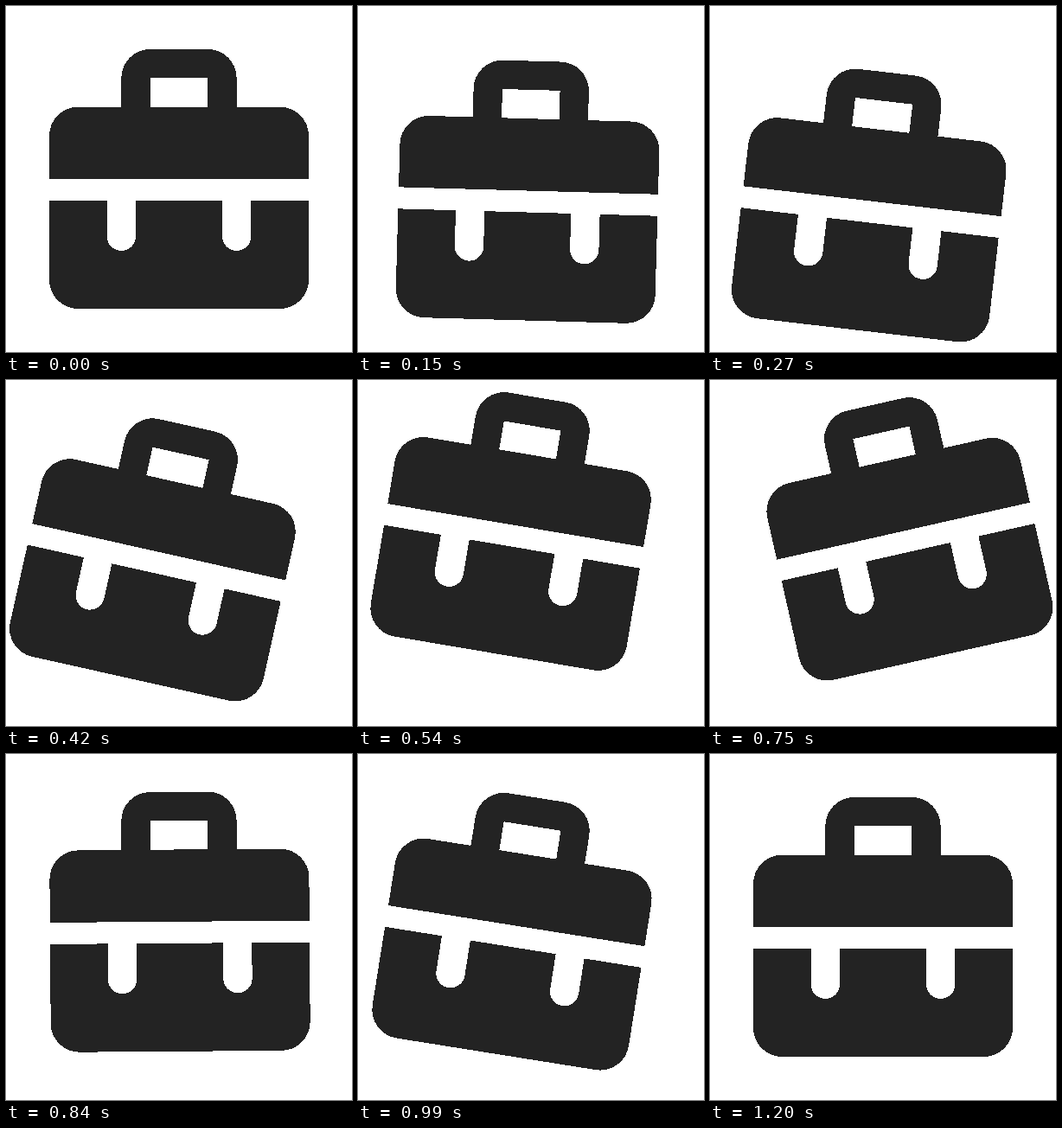
Animation, 400 px wide and 400 px high, one loop 3.23 s. Source, as an HTML page:

```html
<!DOCTYPE html>
<html lang="en">
<head>
<meta charset="utf-8">
<title>Swinging briefcase</title>
<style>
  html, body { margin: 0; width: 100%; height: 100%; overflow: hidden; background: #fff; }
  svg { display: block; width: 100%; height: 100%; }
</style>
</head>
<body>
<svg viewBox="0 0 400 400" shape-rendering="crispEdges">
  <g id="bag" fill="#232323">
    <path d="M50 200V150A33.33 33.33 0 0 1 83.33 116.67H133.33V83.33A33.33 33.33 0 0 1 166.67 50H233.33A33.33 33.33 0 0 1 266.67 83.33V116.67H316.67A33.33 33.33 0 0 1 350 150V200ZM166.67 83.33V116.67H233.33V83.33Z"/>
    <path d="M50 225H116.67V266.67A16.67 16.67 0 0 0 150 266.67V225H250V266.67A16.67 16.67 0 0 0 283.33 266.67V225H350V316.67A33.33 33.33 0 0 1 316.67 350H83.33A33.33 33.33 0 0 1 50 316.67Z"/>
  </g>
</svg>
<script>
  const LOOP = 3230, STEP = 30;
  const PIVOT = '200 93';

  // [time in ms, value, initial pull of the ease towards the next key]
  const angle = [[58, 0], [484, 13.4], [722, -13.8], [940, 10], [1200, 0]];
  const lift = [[0, 0], [300, 27.2, 0.16], [618, -39], [915, 0]];

  const ease = (u, pull = 0) =>
    3 * u * (1 - u) ** 2 * pull + 3 * u * u * (1 - u) + u ** 3;

  function valueAt(keys, t) {
    if (t <= keys[0][0]) return keys[0][1];
    for (let i = 1; i < keys.length; i++) {
      const [t0, a, pull] = keys[i - 1];
      const [t1, b] = keys[i];
      if (t < t1) return a + (b - a) * ease((t - t0) / (t1 - t0), pull);
    }
    return keys[keys.length - 1][1];
  }

  const bag = document.getElementById('bag');

  function draw(now) {
    const t = Math.floor((now % LOOP) / STEP) * STEP;
    const y = valueAt(lift, t).toFixed(3);
    const deg = valueAt(angle, t).toFixed(3);
    bag.setAttribute('transform', `translate(0 ${y}) rotate(${deg} ${PIVOT})`);
  }

  let start;
  function tick(now) {
    start ??= now;
    draw(now - start);
    requestAnimationFrame(tick);
  }

  draw(0);
  requestAnimationFrame(tick);
</script>
</body>
</html>
```
